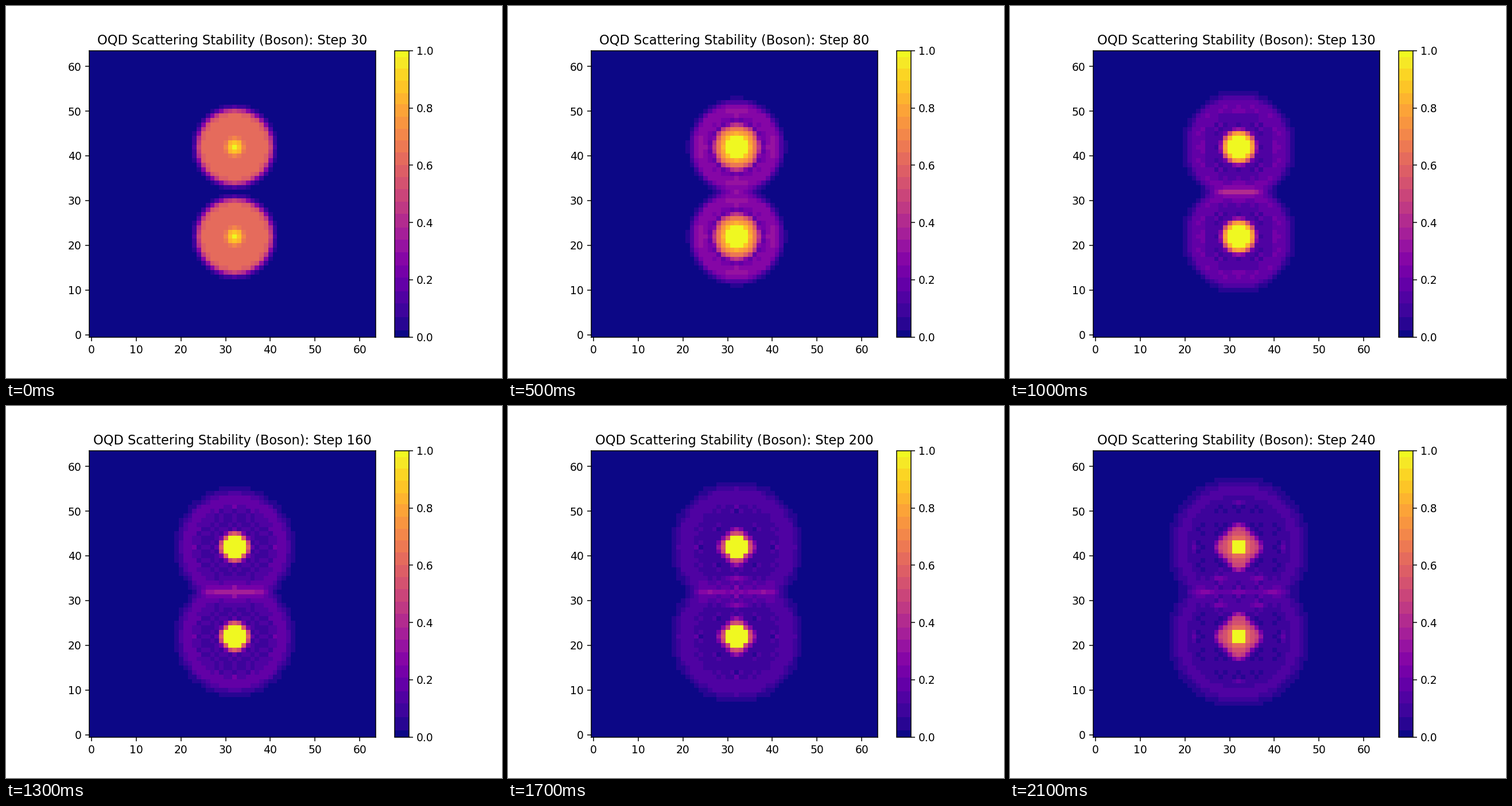
A matplotlib script for the animation above (2200 ms loop, 864 px wide and 648 px high).

```python
import numpy as np
import matplotlib.pyplot as plt
from matplotlib.animation import FuncAnimation
from matplotlib.colors import ListedColormap

plt.rcParams["font.family"] = "DejaVu Sans"

SIZE, MID, OFFSET = 64, 32, 10
FRAMES, INTERVAL = 22, 100
BANDS = 23

y, x = np.mgrid[:SIZE, :SIZE]
dx = np.abs(x - MID)
gap = np.abs(y - MID)
dy = np.abs(gap - OFFSET)  # the two pulses mirror each other
near = np.hypot(dx, dy)
far = np.hypot(dx, gap + OFFSET)
diagonal = np.sin(2 * np.arctan2(dy, dx)) ** 2
along, across = np.maximum(dx, dy), np.minimum(dx, dy)
ripple = np.cos(2.4 * dx) * np.cos(2.4 * dy)


def sigmoid(z):
    return 1 / (1 + np.exp(-z))


def bump(z):
    return np.exp(-z ** 2)


def ramp(step, start, end):
    return np.clip((step - start) / (end - start), 0, 1)


def front(step, r):
    """Expanding wave front with a dimmer, rippled interior."""
    edge = 7.6 + .03 * step
    width = .33 + .0016 * step
    level = .62 * (30 / step) ** .7
    hollow = ramp(step, 30, 60) * sigmoid((edge - 3.2 - r) / .5)
    return level * sigmoid((edge - r) / width) * (1 - hollow * (.42 + .2 * ripple))


def core(step):
    """Breathing halo that turns from round to diamond-shaped."""
    r = near * (1 + .25 * ramp(step, 140, 220) * diagonal)
    reach = 4.3 + .9 * np.cos(2 * np.pi * (step - 80) / 160)
    height = .6 + .12 * np.cos(2 * np.pi * (step - 80) / 240)
    return ramp(step, 30, 60) * height * sigmoid((reach - r) / .45)


def field(step):
    peak = 2.75 * np.sqrt(np.sin(np.pi * (step - 20) / 250))
    v = np.maximum(front(step, near), core(step))
    v += .25 * (1 - .6 * ramp(step, 140, 200)) * bump((near - peak) / .9)

    # bright spots travelling out along the grid axes
    spot = bump((along - 6 - step / 60) / .6) * bump(across / .9)
    v += .09 * ramp(step, 60, 110) * spot

    # overlap of the two fronts, strongest on the midline
    v += np.where(gap == 0, 1, .4) * front(step, far)
    echo = bump((dx - (step - 195) / 10) / 1.4) * (gap == 3)
    v += .12 * ramp(step, 170, 200) * echo

    v[near <= peak] = 1
    return np.clip(v, 0, 1)


def banded_plasma():
    v = np.linspace(0, 1, 256)
    band = np.round((v - .015 * np.sin(np.pi * v)) * BANDS) / BANDS
    return ListedColormap(plt.get_cmap("plasma")(band + .015 * np.sin(np.pi * band)))


fig, ax = plt.subplots(figsize=(6.4, 4.8), dpi=135)
image = ax.imshow(field(30), cmap=banded_plasma(), origin="lower",
                  vmin=0, vmax=1, interpolation="nearest")
fig.colorbar(image, ax=ax)
title = ax.set_title("")


def update(frame):
    step = 30 + 10 * frame
    image.set_data(field(step))
    title.set_text(f"OQD Scattering Stability (Boson): Step {step}")
    return image, title


anim = FuncAnimation(fig, update, frames=FRAMES, interval=INTERVAL,
                     repeat=True, repeat_delay=0, blit=False)
plt.show()
```
